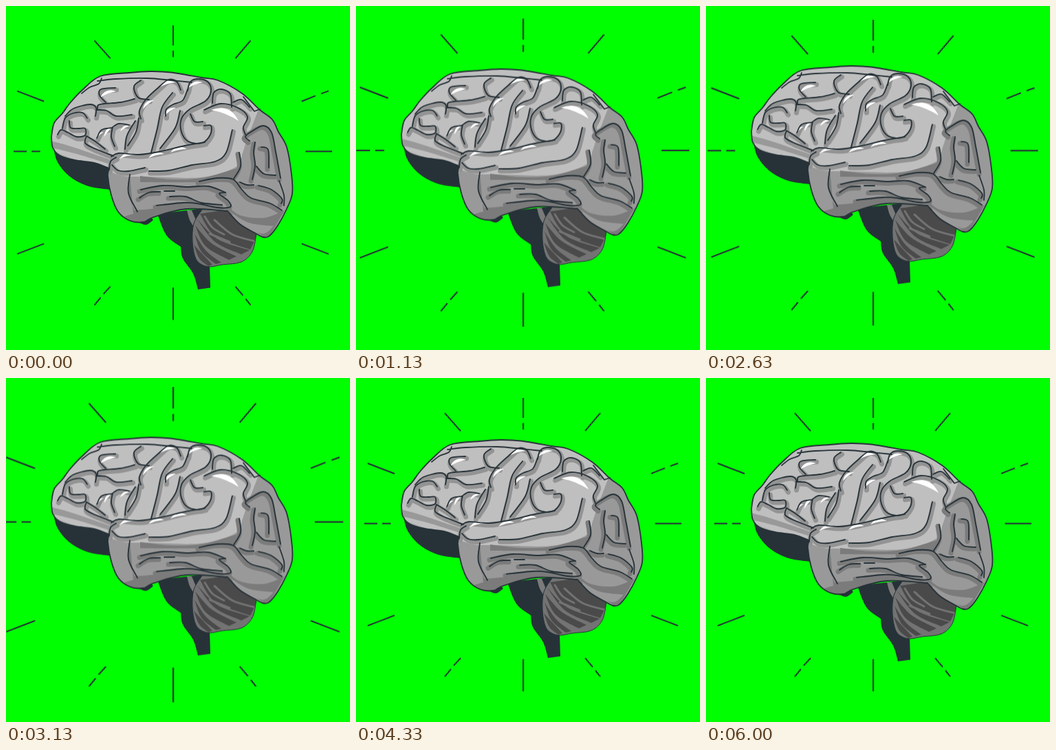
Write an HTML page that moves like this. It is 500 by 500 pixels and loops after 6.04 s.

```html
<!DOCTYPE html>
<html lang="en">
<head>
<meta charset="utf-8">
<title>Brain</title>
<style>
html, body { margin: 0; width: 100%; height: 100%; overflow: hidden; background: #0f0; }
svg { display: block; width: 100vw; height: 100vh; fill: none; stroke-linecap: round; stroke-linejoin: round; }
.dark { fill: #263238; }
.light { fill: #bfbfbf; }
.mid { fill: #999; }
.deep { fill: #7b7b7b; }
.lobe { fill: #737373; }
.stripe { fill: #4a4a4a; }
.white { fill: #fff; }
.lines { stroke: #263238; stroke-width: 1.8; }
.thin { stroke: #263238; stroke-width: 1; }
.soft { stroke: #939393; stroke-width: 7; }
.low { stroke: #7b7b7b; stroke-width: 7; }
.ridge { stroke: #737373; stroke-width: 3; }
.rays { stroke: #263238; stroke-width: 2; stroke-linecap: butt; transform-origin: 242.5px 242px; animation: pulse 6040ms linear infinite; }
.brain { animation: bob 6040ms linear infinite; }
@keyframes bob {
  0%, 100% { transform: translateY(0); }
  50% { transform: translateY(-9px); }
}
@keyframes pulse {
  0% { transform: scale(1.004); }
  9.5% { transform: scale(1.1); }
  28%, 39.4% { transform: scale(1); }
  49.3% { transform: scale(1.1); }
  59.3%, 100% { transform: scale(1); }
}
</style>
</head>
<body>
<svg viewBox="0 0 500 500">
  <!-- data-p: smooth runs of points; "/" makes a corner, "|" starts a new line -->
  <defs>
    <path id="cortex" data-p="66 190 70 170 82 156 93 141 111 122 137 102 179 97 210 95 240 96.5 284 104 308 108 343 127 369 151 387 165 396 183 408 205 415 245 416 273 408 295 395 319 383 334 374 336 362 330 340 317 322 298 / 322 298 262 295 214 307 200 314 180 312 163 299 153 275 148 247 150 236 / 150 236 128 228 100 224 78 217 68 206 66 190"/>
    <path id="cerebellum" data-p="285 296 273 316 271 342 275 365 283 375 296 379 314 376 342 372 358 357 364 331 / 322 297"/>
    <g id="upper">
      <path data-p="86 160 98 149 122 143 131 148 130 160 | 82 178 86 163 97 156 111 155 118 163 | 92 167 94 177 106 178 115 178 115 188 102 190 90 184 80 180 75 187"/>
      <path data-p="159 119 138 121 136 130 145 140 | 133 150 134 144 143 142 166 140 187 135 | 131 151 146 152 160 160 183 158"/>
      <path data-p="196 108 186 117 192 133 208 136 | 222 118 236 107 248 110 254 122 | 222 118 204 135 194 152 196 164 | 193 163 189 183 177 203 | 242 126 227 147 220 178 211 213"/>
      <path data-p="264 123 268 110 280 106 294 111 298 124 290 138 267 150 255 164 255 183 265 197 285 199 297 187 298 174 288 174 | 264 121 257 137 243 143 233 150 232 160 | 253 152 246 177 224 207 | 268 157 274 168 286 168"/>
      <path data-p="300 141 302 126 313 121 326 128 328 147 | 288 151 312 142 337 148 351 161 345 176 348 187 | 330 140 342 136 354 147"/>
      <path data-p="117 189 115 199 126 206 156 218 | 117 189 130 197 144 208 | 132 192 139 180 154 177 | 155 176 164 171 179 173 | 155 176 153 190 158 204 | 188 167 176 188 173 208"/>
      <path data-p="150 238 152 226 160 220 | 153 219 164 214 193 216 222 212 260 203 289 198 | 154 231 163 239 178 240 202 235 | 208 240 237 239 271 231 304 226 320 213 329 180"/>
    </g>
    <g id="lower">
      <path data-p="354 196 348 190 356 183 374 174 386 184 392 212 399 250 | 362 198 360 213 362 232 358 252 | 339 213 341 233 331 251"/>
      <path data-p="364 233 375 244 392 246 | 371 205 381 209 382 235 | 340 256 350 260 360 260 | 367 261 386 267 401 280 400 287"/>
      <path data-p="281 255 307 250 330 252 343 267 356 279 384 287 401 297 | 194 279 208 271 224 270 | 196 267 228 261 264 263 294 262 319 271"/>
      <path data-p="319 271 310 273 323 283 326 292 307 293 278 287 257 286 219 290 | 238 277 261 277 284 286 314 289"/>
    </g>
    <clipPath id="inCortex"><use href="#cortex"/></clipPath>
    <clipPath id="inCerebellum"><use href="#cerebellum"/></clipPath>
  </defs>

  <g class="rays">
    <path d="M243 29V58M243 65.5V75M243 408.5V455.5M12 211.5H31M38 211.5H50.5M434.5 211.5H473"/>
    <path d="M129 51L152 77M355 51L333 77M17 124L56 139M429 139L449 131M457 128L468 124"/>
    <path d="M17 360L56 345M429 345L468 360M152 407L142 418M138 423L129 434M333 407L344 420M348 425L355 434"/>
  </g>

  <g class="brain">
    <path class="dark" data-p="69 206 75 227 93 248 120 262 152 267 / 154 232 / 100 220"/>
    <path class="dark" data-p="188 312 203 318 214 311 / 205 300"/>
    <path class="dark" data-p="220 302 233 333 254 350 / 254 350 257 367 272 389 279 412 / 297 409.5 / 296 376 / 277 340 / 290 294"/>
    <path class="deep" data-p="263 297 267 311 273 321 / 276 311 270 297"/>

    <use href="#cerebellum" class="lobe"/>
    <g clip-path="url(#inCerebellum)">
      <path class="stripe" data-p="282 302 304 334 355 354 / 366 332 / 322 296 | 278 310 304 343 342 361 / 354 355 308 339 278 310 | 275 319 290 349 324 369 / 335 364 299 345 275 319 | 274 331 284 357 305 375 / 313 373 291 356 274 331 | 273 347 281 367 294 378 / 300 376 273 347"/>
      <path class="ridge" data-p="289 306 300 322 317 332 | 303 311 329 332 362 342 | 296 331 325 343"/>
    </g>
    <use href="#cerebellum" class="thin"/>

    <use href="#cortex" class="light"/>
    <g clip-path="url(#inCortex)">
      <path class="mid" data-p="145 238 170 247 205 248 284 249 334 234 344 213 351 192 368 148 / 425 150 / 425 345 / 145 345"/>
      <path class="mid" data-p="65 196 94 204 153 224 / 151 237 100 224 71 212"/>
      <path class="light" data-p="71 207 106 216 148 229 / 148 235 100 223 71 212"/>
      <path class="deep" data-p="180 245 177 270 187 297 / 187 297 220 294 266 287 322 294 / 330 304 / 215 312 / 190 318 / 165 308 185 302"/>
      <path class="deep" data-p="195 247 240 252 285 250 335 236 / 333 251 279 256 195 256"/>
      <path class="deep" data-p="318 287 340 304 375 308 405 297 / 380 340 / 327 300"/>
      <path class="mid" data-p="327 300 345 318 373 331 389 320 / 389 320 353 315 327 300"/>
      <use href="#upper" class="soft" transform="translate(1.5 3)"/>
      <use href="#lower" class="low" transform="translate(-2 2.5)"/>
      <g class="white">
        <path data-lens="137 133 160 124"/>
        <path data-lens="223 118 246 111"/>
        <path data-lens="265 119 286 111"/>
        <path data-lens="199 150 215 137"/>
        <path data-lens="230 160 247 148"/>
        <path data-lens="298 151 338 167"/>
        <path data-lens="143 190 155 176"/>
        <path data-lens="166 182 180 174"/>
        <path data-lens="131 193 142 183"/>
        <path data-lens="165 222 188 216"/>
        <path data-lens="207 221 230 215"/>
        <path data-lens="239 213 263 208"/>
      </g>
    </g>

    <g class="lines">
      <use href="#upper"/>
      <use href="#lower"/>
      <path data-p="110 127 122 118 135 113 139 105 | 133 109 160 106 205 105 240 108 270 111 | 345 132 361 153 / 369 150"/>
      <path data-p="180 245 178 272 191 299 | 397 254 404 275 404 290 | 230 269 245 269"/>
      <use href="#cortex"/>
    </g>
  </g>
</svg>
<script>
const numbers = text => text.trim().split(/\s+/).map(Number);

// Catmull-Rom run of points as cubic curves
function curve(run, start) {
  const n = numbers(run), last = n.length / 2 - 1;
  const at = i => n.slice(2 * Math.max(0, Math.min(last, i))).slice(0, 2);
  let d = start + at(0);
  for (let i = 0; i < last; i++) {
    const [a, b, c, e] = [i - 1, i, i + 1, i + 2].map(at);
    const out = b.map((v, k) => v + (c[k] - a[k]) / 6);
    const into = c.map((v, k) => v - (e[k] - b[k]) / 6);
    d += `C${out} ${into} ${c}`;
  }
  return d;
}

const smooth = text => text.split("|").map(line =>
  line.split("/").map((run, i) => curve(run, i ? "L" : "M")).join("")).join("");

// Crescent between two tips, arched upwards
function lens(text) {
  const [x, y, u, v] = numbers(text);
  const bend = k => [(x + u) / 2 + (v - y) * k, (y + v) / 2 - (u - x) * k];
  return `M${x} ${y}Q${bend(0.45)} ${u} ${v}Q${bend(0.1)} ${x} ${y}Z`;
}

for (const path of document.querySelectorAll("path[data-p]")) {
  path.setAttribute("d", smooth(path.dataset.p));
}
for (const path of document.querySelectorAll("path[data-lens]")) {
  path.setAttribute("d", lens(path.dataset.lens));
}
document.querySelector("#cortex").setAttribute("d", smooth(document.querySelector("#cortex").dataset.p) + "Z");
document.querySelector("#cerebellum").setAttribute("d", smooth(document.querySelector("#cerebellum").dataset.p) + "Z");
</script>
</body>
</html>
```
